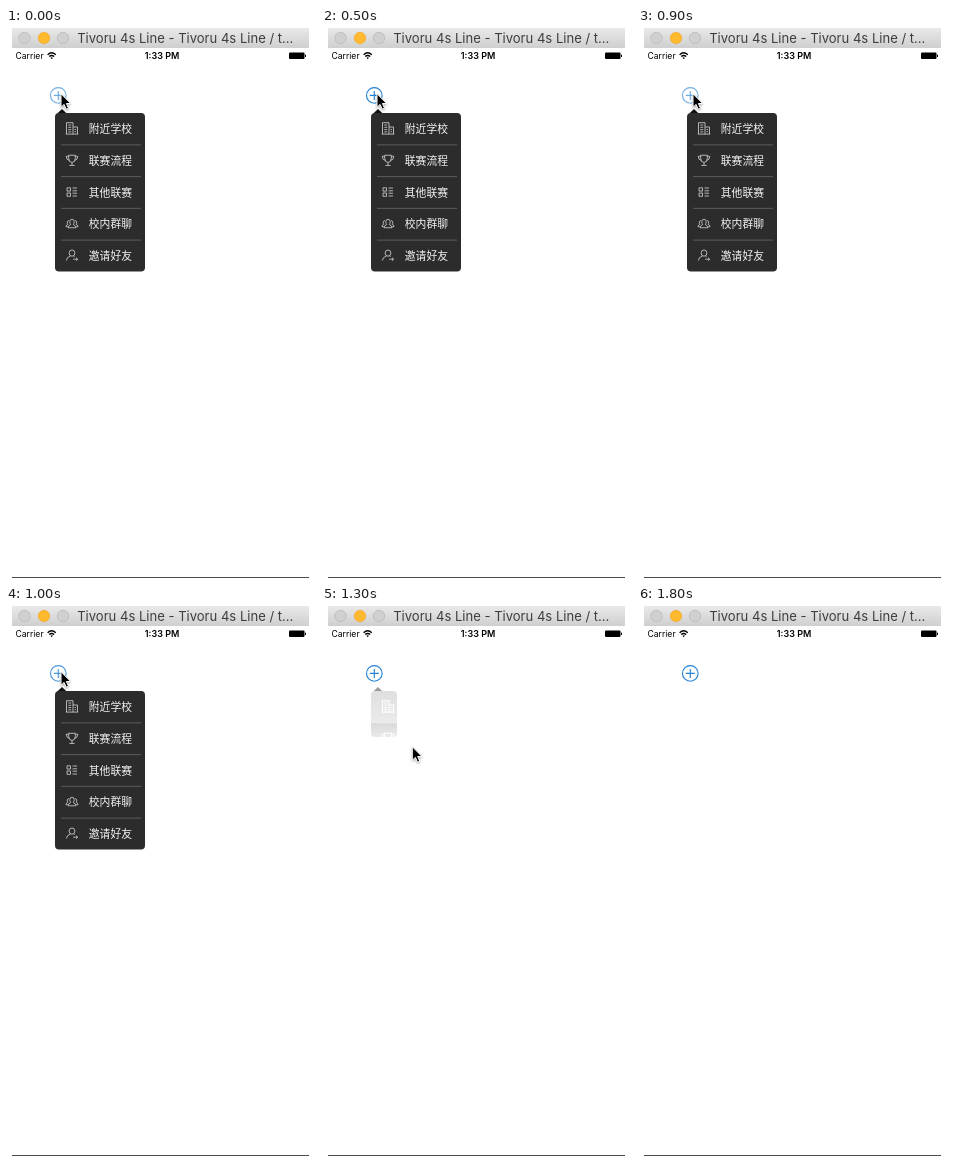
An HTML page for the animation above (2.4 s loop, 310x550 px).

```html
<!DOCTYPE html>
<html lang="zh">
<head>
<meta charset="utf-8">
<style>
  html, body { margin: 0; width: 100%; height: 100%; overflow: hidden; background: #fff; }
  svg { display: block; width: 310px; height: 550px; }
  text { font-family: Inter, Roboto, sans-serif; white-space: pre; }
  .label { font: 10.8px "Noto Sans CJK SC", "Noto Sans CJK", sans-serif; fill: #f4f4f4; }
  .icon { fill: none; stroke: #d6d6d6; stroke-width: .8; }
  .panel { fill: #2c2c2c; }
  .rule { stroke: #696969; stroke-width: .8; }
  .fading .panel { fill: url(#fade); }
  .fading .icon { stroke: #fff; stroke-width: 1.1; }
  .fading .rule { stroke: #eee; }
</style>
</head>
<body>
<svg viewBox="0 0 310 550">
  <defs>
    <linearGradient id="bar" x2="0" y2="1">
      <stop stop-color="#e9e9e9"/><stop offset="1" stop-color="#cfcfcf"/>
    </linearGradient>
    <linearGradient id="fade" gradientUnits="userSpaceOnUse" x1="0" x2="0" y1="85" y2="131">
      <stop stop-color="#dfdfdf"/><stop offset=".69" stop-color="#ebebeb"/>
      <stop offset=".69" stop-color="#d9d9d9"/><stop offset="1" stop-color="#eaeaea"/>
    </linearGradient>
    <clipPath id="clip"><rect id="hole" x="49" y="85" rx="4"/></clipPath>
  </defs>

  <rect x="6" width="297" height="20" fill="url(#bar)"/>
  <g fill="#d0d0d0" stroke="#b9b9b9" stroke-width=".8">
    <circle cx="18.5" cy="10" r="5.7"/>
    <circle cx="38" cy="10" r="5.7" fill="#ffb92e" stroke="#efac35"/>
    <circle cx="57" cy="10" r="5.7"/>
  </g>
  <text x="71.2" y="14.7" font-size="13.05" fill="#3e3e3e">Tivoru 4s Line - Tivoru 4s Line / t…</text>

  <text x="9.5" y="31" font-size="8.6">Carrier</text>
  <g fill="none" stroke="#000" stroke-width="1.3">
    <path d="M41.6 26.7Q45.7 22.9 49.8 26.7M43.2 28.6Q45.7 26.3 48.2 28.6"/>
    <path d="M45.7 31.2L44.5 29.8Q45.7 28.9 46.9 29.8Z" fill="#000" stroke="none"/>
  </g>
  <text x="156" y="31" font-size="9" font-weight="600" text-anchor="middle">1:33 PM</text>
  <rect x="283" y="24.5" width="15.5" height="6.5" rx="1"/>
  <rect x="299" y="26.5" width="1" height="2.6" rx=".5"/>
  <rect x="6" y="549" width="297" height="1" fill="#4b4b4b"/>

  <g id="plus" fill="none" stroke="#2483d8" stroke-width="1.15">
    <circle cx="52.3" cy="67.4" r="7.8"/>
    <path d="M47.8 67.4H56.8M52.3 62.9V71.9"/>
  </g>

  <path id="arrow" d="M51 85.7L56 81L61 85.7Z" fill="#111"/>
  <g id="menu" clip-path="url(#clip)">
    <rect class="panel" x="49" y="85" width="90" height="159"/>
    <g id="rows"></g>
  </g>

  <path id="cursor" d="M0 0V13.6L3.1 10.7L5.2 15.5L7.5 14.5L5.4 9.8H9.7Z"
        fill="#000" stroke="#fff" stroke-width="1" stroke-linejoin="round"
        style="filter: drop-shadow(0 1px 1px #0005)"/>
</svg>

<script>
const el = id => document.getElementById(id);
const set = (node, name, value) => node.setAttribute(name, value);

// Icons are centred on 0,0.
const items = [
  ['附近学校', 'M-5.5 5.5V-5.8H1V5.5M1 -1.5H5.5V5.5M-6.2 5.6H6.2M-3.7 -3.5H-.8M-3.7 -1.2H-.8M-3.7 1.1H-.8M-3.7 3.4H-.8M2.6 1H4M2.6 3.2H4'],
  ['联赛流程', 'M-3.3 -5H3.3V-2Q3.3 2 0 2.3Q-3.3 2 -3.3 -2ZM-3.3 -4H-5.8Q-5.7 -.4 -2.7 .2M3.3 -4H5.8Q5.7 -.4 2.7 .2M0 2.3V5M-2.6 5.2H2.6'],
  ['其他联赛', 'M-5 -4.2H-1.5V-.9H-5ZM-5 1H-1.5V4.3H-5ZM.5 -4H5M.5 -1.2H5M.5 1.2H5M.5 4H5'],
  ['校内群聊', 'M-2.2 -2A2.2 2.5 0 1 1 2.2 -2Q2 .3 1.3 .8Q3.8 1.6 3.8 4H-3.8Q-3.8 1.6 -1.3 .8Q-2 .3 -2.2 -2M-3 -3.2Q-5.3 -3 -4.7 -.2L-4.2 .5Q-6 1.2 -6 3H-4M3 -3.2Q5.3 -3 4.7 -.2L4.2 .5Q6 1.2 6 3H4'],
  ['邀请好友', 'M-2.9 -2.4A2.9 3.1 0 1 1 2.9 -2.4A2.9 3.1 0 1 1 -2.9 -2.4M-1.5 .5Q-5.3 1.5 -5.6 5M1.5 .5L2.6 1.1M1.2 3.7H5.6M4 2.2L5.6 3.7L4 5.2']
];
el('rows').innerHTML = items.map(([label, icon], i) => {
  const y = 101 + i * 31.75;
  const rule = i ? `<path class="rule" d="M55 ${y - 15.9}H135"/>` : '';
  return `${rule}<path class="icon" d="${icon}" transform="translate(66 ${y - .5})"/>
    <text class="label" x="82.8" y="${y + 4}">${label}</text>`;
}).join('');

const LOOP = 2400, TICK = 100;
const OPEN = 'open', SHRINK = 'shrink', NONE = 'none';
const at = (table, t) => table.filter(step => step[0] <= t).pop().slice(1);

const menuSteps = [[0, OPEN], [600, SHRINK], [700, NONE], [900, OPEN], [1300, SHRINK], [1400, NONE]];
const plusSteps = [[0, .65], [100, .82], [200, 1], [800, .18], [900, .65], [1000, .82], [1100, 1]];
const cursorSteps = [[0, 55, 65.7], [1100, 72, 102], [1200, 90.3, 140.7], [1600, -50, -50]];

function draw(now) {
  const t = Math.floor(now % LOOP / TICK) * TICK;
  const [state] = at(menuSteps, t);
  const shrunk = state === SHRINK, shown = state !== NONE;
  set(el('hole'), 'width', shrunk ? 26 : 90);
  set(el('hole'), 'height', shrunk ? 46 : 158.6);
  set(el('menu'), 'class', shrunk ? 'fading' : '');
  set(el('menu'), 'opacity', shown ? 1 : 0);
  set(el('arrow'), 'opacity', shown ? (shrunk ? .42 : 1) : 0);
  set(el('plus'), 'opacity', at(plusSteps, t)[0]);
  set(el('cursor'), 'transform', `translate(${at(cursorSteps, t)})`);
}

const start = performance.now();
function frame() {
  draw(performance.now() - start);
  requestAnimationFrame(frame);
}
frame();
</script>
</body>
</html>
```
